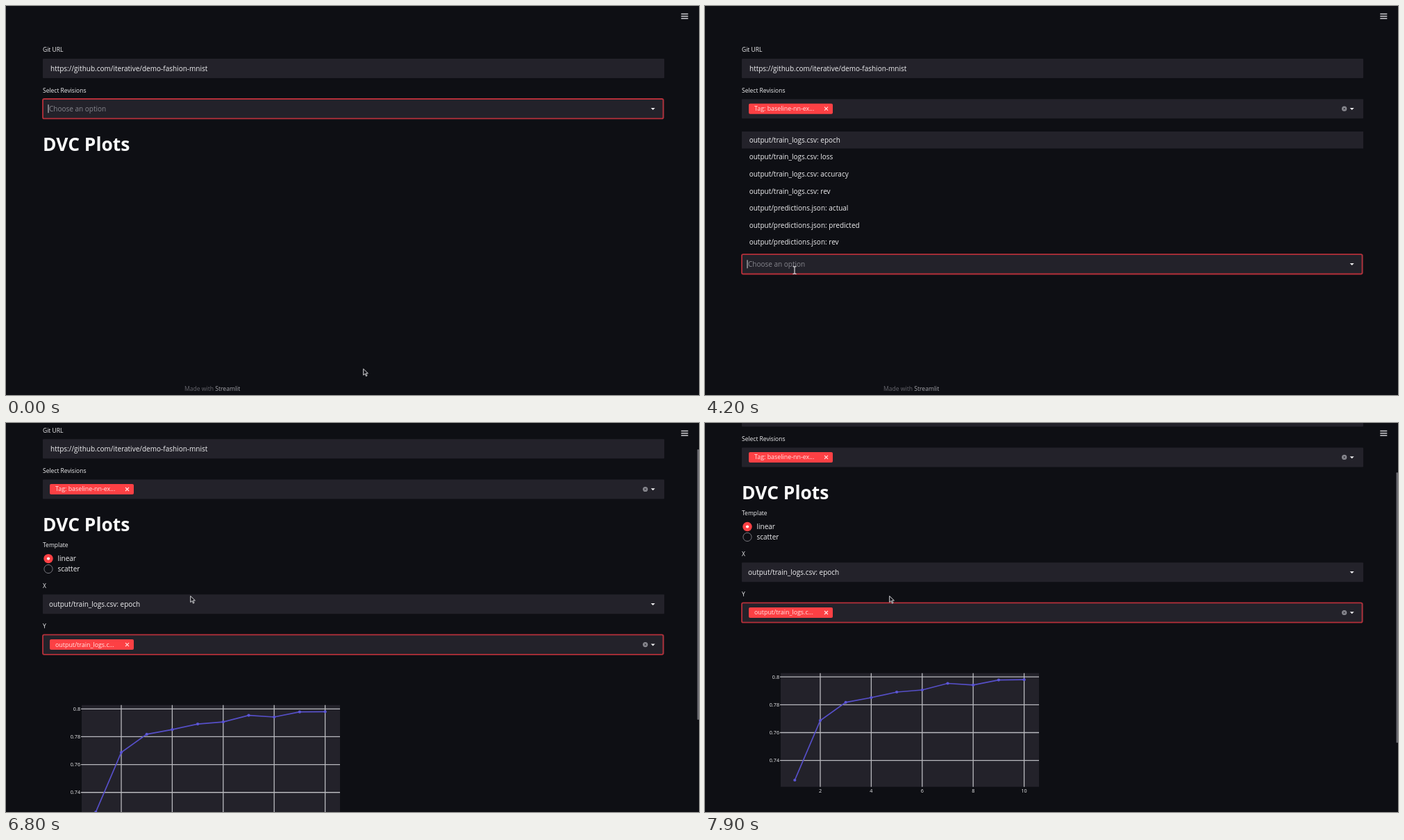
An HTML page that plays this animation: 998x561 px, repeating every 8 s.

```html
<!DOCTYPE html>
<html lang="en">
<head>
<meta charset="utf-8">
<title>DVC Plots</title>
<style>
  html, body { margin: 0; width: 100%; height: 100%; overflow: hidden; background: #0e0f14; }
  svg { display: block; width: 998px; height: 561px; }
  text { font: 10px "Open Sans", "Noto Sans", sans-serif; fill: #f0f0f2; }
  .label { font-size: 8.5px; }
  .chip { font-size: 8.9px; fill: #ffe4e4; }
  .tick { font-size: 7.2px; }
  .faint { fill: #85858c; }
  .title { font-size: 26.4px; font-weight: 700; fill: #fafafa; }
  .footer { font-size: 8.6px; fill: #66666d; }
</style>
</head>
<body>
<svg id="stage" viewBox="0 0 998 561"></svg>
<script>
const LOOP = 8000, STEP = 100;
const BG = '#0e0f14', FIELD = '#23222a', RED = '#fd4044', BORDER = '#b5303a';
const OPTIONS = [
  'output/train_logs.csv: epoch', 'output/train_logs.csv: loss',
  'output/train_logs.csv: accuracy', 'output/train_logs.csv: rev',
  'output/predictions.json: actual', 'output/predictions.json: predicted',
  'output/predictions.json: rev'
];
const ROW_TOP = 181, ROW = 24.6;
const TIME = { typing: 300, key: 200, pickTag: 2000, form: 2700, openY: 3800, pickY: 5700, chart: 6200 };

const rect = (x, y, w, h, fill, extra = '') =>
  `<rect x="${x}" y="${y}" width="${w}" height="${h}" fill="${fill}" ${extra}/>`;
const text = (x, y, str, cls = '', extra = '') =>
  `<text x="${x}" y="${y}" class="${cls}" ${extra}>${str}</text>`;
const path = (d, stroke, width = 1, fill = 'none') =>
  `<path d="${d}" stroke="${stroke}" stroke-width="${width}" fill="${fill}"/>`;
const group = (id, body) => `<g id="${id}">${body}</g>`;

const field = mid => rect(53, mid - 14, 895, 28, FIELD, 'rx="1"');
const focus = mid => rect(53, mid - 14.2, 893.5, 28.4, 'none', `rx="2" stroke="${BORDER}" stroke-width="1.8"`);
const arrow = mid => `<path d="M928.7 ${mid - 1.2}h6l-3 3z" fill="#f0f0f2"/>`;
const clear = mid => `<circle cx="920.7" cy="${mid}" r="3.6" fill="#8a8a91"/>` +
  path(`M919.4 ${mid - 1.3}l2.6 2.6m0 -2.6l-2.6 2.6`, FIELD, .9);
const caret = mid => path(`M61 ${mid - 6}v12`, '#d8d8dc');
const chip = (mid, str) => rect(63, mid - 7.5, 121, 15, RED, 'rx="2"') +
  text(71, mid + 3, str, 'chip') + path(`M172 ${mid - 2.5}l5 5m0 -5l-5 5`, '#ffe4e4', 1.1);

function chart() {
  const left = 109, right = 481, top = 459.5, bottom = 623.5;
  const px = v => 129.3 + (v - 1) * 36.7;
  let out = rect(left, top, right - left, bottom - top, FIELD), grid = '';
  for (let v = 2; v <= 10; v += 2) {
    grid += `M${px(v)} ${top}V${bottom}`;
    out += text(px(v), 632.2, v, 'tick', 'text-anchor="middle"');
  }
  for (let i = 0; i < 4; i++) {
    const y = 465 + i * 40.15;
    grid += `M${left - 1} ${y}H${right}`;
    out += text(107, y + 2.5, +(.8 - i * .02).toFixed(2), 'tick', 'text-anchor="end"');
  }
  out += path(grid, '#b9b9be', 1.3);
  const points = [613.8, 527.8, 501.6, 494.8, 486.8, 483.8, 474.3, 476.7, 469.4, 469].map((y, i) => [px(i + 1), y]);
  out += path('M' + points.map(p => p.join(' ')).join('L'), '#564fc8', 1.7);
  return out + points.map(([x, y]) => `<circle cx="${x}" cy="${y}" r="2.1" fill="#5c56d6"/>`).join('');
}

const form = text(53, 232, 'Template', 'label') +
  `<circle cx="61" cy="248.3" r="6.7" fill="${RED}"/><circle cx="61" cy="248.3" r="2.1" fill="#fff"/>` +
  text(74.5, 251.8, 'linear') +
  `<circle cx="61" cy="263.2" r="6.1" fill="${BG}" stroke="#77777e"/>` + text(74.5, 266.8, 'scatter') +
  text(53, 290.7, 'X', 'label') + field(314) + text(62, 317.5, OPTIONS[0]) + arrow(314) +
  text(53, 349, 'Y', 'label') + field(372.3) + arrow(372.3) +
  group('emptyY', text(62, 375.8, 'Choose an option', 'faint')) +
  group('chipY', chip(372.3, 'output/train_logs.c...') + clear(372.3)) +
  group('focusY', focus(372.3)) + group('caretY', caret(372.3));

const listY = rect(52, 176, 897, 181, BG) +
  `<rect id="hover" x="53" width="895" height="24.5" fill="${FIELD}"/>` +
  OPTIONS.map((name, i) => text(63.7, ROW_TOP + ROW * i + 15.8, name)).join('');

const page = text(53, 66.3, 'Git URL', 'label') + field(90) +
  text(64, 93.5, 'https://github.com/iterative/demo-fashion-mnist') +
  text(53, 124.8, 'Select Revisions', 'label') + field(148.2) + arrow(148.2) +
  group('emptyTag', text(62, 151.7, 'Choose an option', 'faint')) +
  '<text id="typed" x="61" y="151.7"></text>' +
  group('clearTag', clear(148.2)) + group('chipTag', chip(148.2, 'Tag: baseline-nn-ex...')) +
  group('focusTag', focus(148.2)) + group('caretTag', caret(148.2)) +
  text(53, 208.5, 'DVC Plots', 'title') +
  group('listTag', rect(52, 165, 897, 32, BG) + rect(53, 168, 895, 25, FIELD) +
    text(63.7, 183.8, 'Tag: baseline-nn-experiment (02b68b7)')) +
  group('form', form) + group('listY', listY) + group('chart', chart()) +
  group('footer', text(257, 555.2, 'Made with <tspan fill="#a3a3a9">Streamlit</tspan>', 'footer'));

// Each pointer is drawn around its hot spot.
const pointers =
  group('arrow', path('M0 0V9l2.2 -2 1.6 3.6 1.5 -.7 -1.6 -3.4h3z', '#d5d5d8', 1, '#15161b')) +
  group('beam', path('M-2.5 -5.5q2 0 2.5 1.2q.5 -1.2 2.5 -1.2M0 -4.3V4.3M-2.5 5.5q2 0 2.5 -1.2q.5 1.2 2.5 1.2', '#c9c9cd', 1.3)) +
  group('hand', path('M-2 -5q1.2 -.6 1.6 .6l.6 2.3 3.6 .9q1 .5 .6 2l-.8 3.6h-4.6l-2.8 -3.6q.3 -1 2 -.2z', '#3a3a40', .6, '#f4f4f6'));

document.getElementById('stage').innerHTML = rect(0, 0, 998, 561, BG) + group('page', page) +
  path('M972.3 11.6h10M972.3 14.8h10M972.3 18h10', '#d0d0d4', 1.5) +
  `<rect id="thumb" x="995.5" width="2.5" height="390" rx="1" fill="#6b6b71"/>` + group('pointer', pointers);

const $ = id => document.getElementById(id);
const show = (id, on) => $(id).setAttribute('display', on ? 'inline' : 'none');
const smooth = p => p * p * (3 - 2 * p);

// Eased interpolation over keys of the form [time, value, ...].
function track(keys, t) {
  let from = keys[0];
  for (const to of keys) {
    if (t < to[0]) {
      const p = smooth(Math.max(0, (t - from[0]) / (to[0] - from[0])));
      return from.slice(1).map((v, i) => v + (to[i + 1] - v) * p);
    }
    from = to;
  }
  return from.slice(1);
}

const POINTER = [
  [0, 514.7, 523.3], [900, 514.7, 523.3], [1500, 249, 161], [1700, 249, 161], [1900, 215, 182],
  [3000, 215, 182], [3700, 129, 381], [4600, 129, 381], [5400, 201, 245],
  [5800, 201, 245], [6300, 265.7, 249.5]
];
const SCROLL = [[6400, 0], [7200, 129.6], [7400, 129.6], [7800, 98.8]];

function scrollAt(t) {
  // The wheel turns at a nearly even rate on the way down.
  if (t >= 6500 && t < 7200) return t < 6800 ? (t - 6500) / 300 * 52.7 : 52.7 + (t - 6800) / 400 * 76.9;
  return t < 6500 ? 0 : track(SCROLL, t)[0];
}

function render(t) {
  const typed = 'base'.slice(0, Math.max(0, Math.floor((t - TIME.typing) / TIME.key) + 1));
  const tagged = t >= TIME.pickTag, chosen = t >= TIME.pickY, open = t >= TIME.openY && !chosen;
  const blink = t % 1000 < 500, plotted = t >= TIME.chart;
  const [x, y] = track(POINTER, t), scroll = scrollAt(t);

  $('typed').textContent = tagged ? '' : typed;
  show('emptyTag', !typed);
  show('clearTag', typed);
  show('chipTag', tagged);
  show('focusTag', t < TIME.openY);
  show('caretTag', !typed && blink);
  show('listTag', typed && !tagged);
  show('form', t >= TIME.form);
  show('emptyY', !chosen);
  show('chipY', chosen);
  show('focusY', t >= TIME.openY);
  show('caretY', open && blink);
  show('listY', open);
  show('chart', plotted);
  show('footer', !plotted);
  show('thumb', plotted);

  const row = t > 4600 ? Math.floor((y - ROW_TOP) / ROW) : 0;
  $('hover').setAttribute('y', ROW_TOP + ROW * (row < OPTIONS.length ? row : 0));
  $('page').setAttribute('transform', `translate(0 ${-scroll})`);
  $('thumb').setAttribute('y', scroll * .72);
  $('pointer').setAttribute('transform', `translate(${x} ${y})`);

  const inField = Math.abs(y - 148.2) < 14 || (t >= TIME.form && Math.abs(y - 372.3) < 14);
  const onOption = (typed && !tagged && y > 168 && y < 193) || (open && y < 357);
  const kind = onOption ? 'hand' : inField ? 'beam' : 'arrow';
  for (const name of ['arrow', 'beam', 'hand']) show(name, name === kind);
}

const start = performance.now();
function tick() {
  const t = (performance.now() - start) % LOOP;
  render(Math.floor(t / STEP) * STEP);
  requestAnimationFrame(tick);
}
tick();
</script>
</body>
</html>
```
